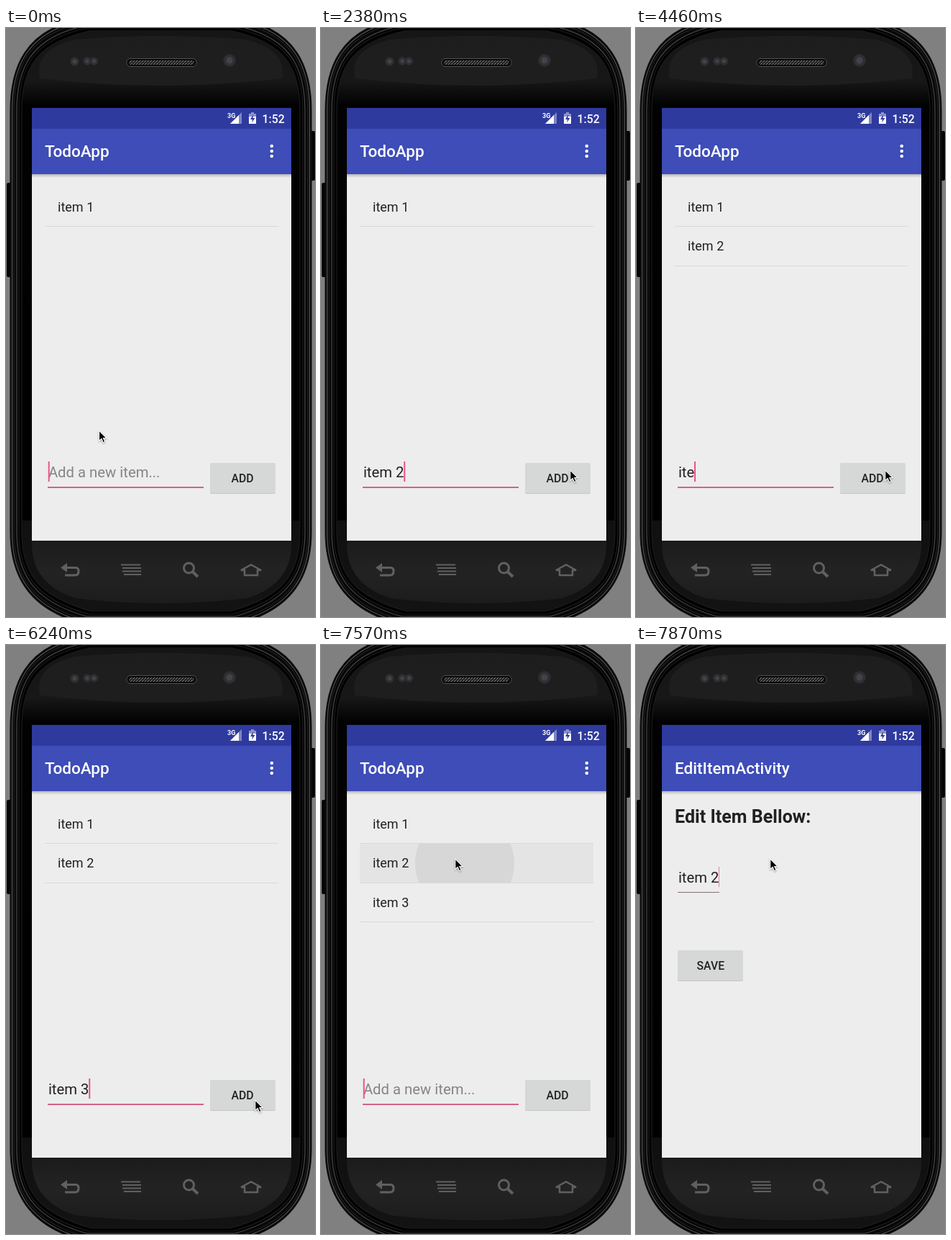
An HTML page that plays this animation: 430 by 818 pixels, repeating every 8000 ms.

```html
<!DOCTYPE html>
<html lang="en">
<head>
<meta charset="utf-8">
<title>TodoApp</title>
<style>
  html, body { margin: 0; width: 100%; height: 100%; overflow: hidden; background: #808080; }
  svg { display: block; width: 430px; height: 818px; }
  text { font-family: Roboto, sans-serif; fill: #212121; white-space: pre; }
  .title { font-size: 22.56px; font-weight: 500; fill: #fff; }
  .row { font-size: 18.05px; }
  .field { font-size: 20.3px; }
  .label { font-size: 15.8px; font-weight: 500; text-anchor: middle; }
  .clock { font-size: 15.8px; font-weight: 500; fill: #fff; }
  .keys { fill: none; stroke: #606060; stroke-width: 3; }
  #mouse { filter: drop-shadow(0 1px 1px rgba(0, 0, 0, .35)); }
</style>
</head>
<body>
<svg viewBox="0 0 430 818">
  <defs>
    <clipPath id="screen"><rect x="36" y="111" width="361" height="601"/></clipPath>
    <clipPath id="addClip"><rect x="284" y="604" width="91" height="42" rx="2"/></clipPath>
    <clipPath id="rowClip"><rect x="54" y="275.5" width="325" height="54.5"/></clipPath>
    <linearGradient id="face" gradientUnits="userSpaceOnUse" x1="0" y1="0" x2="0" y2="818">
      <stop stop-color="#151515"/><stop offset=".09" stop-color="#171717"/><stop offset=".13" stop-color="#020202"/>
      <stop offset=".836" stop-color="#000"/><stop offset=".836" stop-color="#101010"/><stop offset="1" stop-color="#131313"/>
    </linearGradient>
    <linearGradient id="chin" x2="0" y2="1">
      <stop stop-color="#1b1b1b"/><stop offset=".5" stop-color="#232323"/><stop offset="1" stop-color="#1c1c1c"/>
    </linearGradient>
    <linearGradient id="shade" x2="0" y2="1">
      <stop stop-opacity=".22"/><stop offset="1" stop-opacity="0"/>
    </linearGradient>
    <pattern id="mesh" width="4" height="4" patternUnits="userSpaceOnUse">
      <rect width="4" height="4" fill="#111"/><path d="M0 4L4 0" stroke="#6a6a6a" stroke-width="1.3"/>
    </pattern>
    <g id="bar">
      <rect x="36" y="140" width="361" height="63" fill="#3e4db7"/>
      <rect x="36" y="203" width="361" height="5" fill="url(#shade)"/>
    </g>
    <g id="button">
      <rect y="1" width="91" height="42" rx="2" fill="#c6c6c6"/>
      <rect width="91" height="42" rx="2" fill="#d6d7d7"/>
    </g>
  </defs>

  <!-- phone body -->
  <rect x="1" y="215" width="8" height="131" rx="2" fill="#050505"/>
  <rect x="422" y="143" width="8" height="69" rx="2" fill="#050505"/>
  <g id="rims"></g>
  <path d="M96 16Q215 6 334 16Q392 30 384 70Q215 90 47 70Q38 30 96 16Z" fill="#222" opacity=".7"/>
  <path d="M36 712H397Q400 771 336 792Q216 806 97 792Q34 772 36 712Z" fill="url(#chin)"/>
  <rect x="168" y="42.5" width="97" height="11" rx="5" fill="#080808" stroke="#505050"/>
  <rect x="171" y="45" width="91" height="6" rx="3" fill="url(#mesh)"/>
  <g fill="#303033" stroke="#292929">
    <circle cx="95.5" cy="46.5" r="6"/><circle cx="113" cy="46" r="5.5"/><circle cx="122.5" cy="46" r="5.5"/>
    <circle cx="311" cy="45" r="8.5"/>
  </g>
  <g fill="#41434b">
    <circle cx="95.5" cy="46.5" r="3"/><circle cx="113" cy="46" r="2.5"/><circle cx="122.5" cy="46" r="2.5"/>
    <circle cx="311" cy="45" r="4.5"/>
  </g>
  <g class="keys">
    <path d="M83 749.5H97Q101 749.5 101 754.5Q101 760 96 760H82"/>
    <path d="M76 749.5L85 743V756Z" fill="#606060" stroke="none"/>
    <path d="M160 745.5H187M162 750H188M162 754.5H188M164 759H188" stroke-width="2"/>
    <circle cx="254.5" cy="750" r="7"/><path d="M259.5 755L267 762" stroke-width="4"/>
    <path d="M327 753L341 745.5L355 753H350V760H332V753Z" stroke-width="2.5"/>
  </g>

  <g clip-path="url(#screen)">
    <rect x="36" y="111" width="361" height="601" fill="#ededed"/>
    <g id="list">
      <use href="#bar"/>
      <text class="title" x="54" y="179.3">TodoApp</text>
      <g fill="#fff"><circle cx="369.8" cy="164" r="2.3"/><circle cx="369.8" cy="171" r="2.3"/><circle cx="369.8" cy="178" r="2.3"/></g>
      <g id="rowPress" clip-path="url(#rowClip)">
        <rect x="54" y="275" width="325" height="56" fill="#e4e4e4"/>
        <circle id="rowRipple" cy="303" fill="#d7d7d7"/>
      </g>
      <g id="rows"></g>
      <text id="hint" class="field" x="58.9" y="624" style="fill:#858585">Add a new item...</text>
      <text id="typed" class="field" x="58.9" y="624"></text>
      <rect x="58" y="637" width="217" height="2" fill="#d4608b"/>
      <rect id="caret" y="602" width="2" height="28" fill="#f0508a"/>
      <use href="#button" x="284" y="604"/>
      <g id="addPress" clip-path="url(#addClip)">
        <rect x="284" y="604" width="91" height="42" fill="#c9caca"/>
        <circle id="addRipple" cx="338" cy="625" r="34" fill="#bcbdbd"/>
      </g>
      <text class="label" x="329" y="631">ADD</text>
    </g>
    <g id="edit">
      <rect x="36" y="140" width="361" height="590" fill="#ededed"/>
      <use href="#bar"/>
      <text class="title" x="54" y="179.3">EditItemActivity</text>
      <text x="54" y="247" font-size="25.1" font-weight="700">Edit Item Bellow:</text>
      <text class="field" x="58.9" y="330">item 2</text>
      <rect x="58" y="343" width="58" height="1" fill="#83706f"/>
      <rect x="115" y="308" width="1" height="28" fill="#de86a5"/>
      <use href="#button" x="58" y="424"/>
      <text class="label" x="103.8" y="451">SAVE</text>
    </g>
    <rect x="36" y="111" width="361" height="29" fill="#2f3a9e"/>
    <text x="308" y="125" font-size="9" font-weight="700" style="fill:#fff">3G</text>
    <path d="M328 117V133H312Z" fill="#7f86c4"/>
    <path d="M324 121V133H312Z" fill="#fff"/>
    <path d="M338 119H341V117H345V119H348V133H338Z" fill="#8d93cb"/>
    <path d="M338 123H348V133H338Z" fill="#fff"/>
    <path d="M344 120L340 127H343L342 131.5L346.5 125H343.5Z" fill="#2f3a9e"/>
    <text class="clock" x="356.5" y="131.5">1:52</text>
  </g>
  <path id="mouse" d="M0 0V14.5L3.4 11.5L5.7 16.8L8.3 15.7L6 10.5H10.5Z"
        fill="#000" stroke="#fff" stroke-width="1.1"/>
</svg>
<script>
const LOOP = 8000, TICK = 148.5;
const $ = id => document.getElementById(id);
const show = (id, on) => $(id).style.display = on ? '' : 'none';
const mix = (a, b, p) => a + (b - a) * p;
const ease = p => p * p * (3 - 2 * p);

// Outline of the casing, inset by d
function casing(d) {
  const l = 6 + d, r = 425 - d, top = d - 12, base = 826 - d;
  return `M${l} 115C${l} 55 ${l + 20} ${top + 16} ${l + 95} ${top}H${r - 95}
    C${r - 20} ${top + 16} ${r} 55 ${r} 115V700C${r} 760 ${r - 25} ${base - 20} ${r - 97} ${base}
    H${l + 97}C${l + 25} ${base - 20} ${l} 760 ${l} 700Z`;
}
$('rims').innerHTML = [[0, '#060606', '#111'], [2.5, '#060606', '#555'], [5, '#080808', '#222'],
  [9, '#030303', '#484848'], [12, '#000', '#1b1b1b'], [16, 'url(#face)', '#1b1b1b']].map(([d, fill, line]) =>
  `<path d="${casing(d)}" fill="${fill}" stroke="${line}" stroke-width="1.2"/>`).join('');

$('rows').innerHTML = [1, 2, 3].map(i => {
  const y = 275.4 + (i - 1) * 54.7;
  return `<g id="row${i}"><text class="row" x="72" y="${y - 20.7}">item ${i}</text>
    <rect x="54" y="${Math.floor(y)}" width="325" height="1" fill="#d9d9d9"/></g>`;
}).join('');

// Tick at which the field takes each value
const typing = [[0, ''], [2, 'i'], [3, 'ite'], [4, 'item'], [6, 'item '], [9, 'item 2'], [19, ''],
  [26, 'i'], [28, 'it'], [30, 'ite'], [31, 'item'], [32, 'item '], [36, 'item 3'], [44, '']];
const caretOff = [[12, 16], [22, 25], [39, 42], [47, 50]];
// Mouse stops: tick, x, y
const stops = [[0, 129.5, 559], [12, 129.5, 559], [16, 346.8, 614], [39, 346.8, 614],
  [40, 346.8, 632], [44, 346.8, 632], [48, 186.8, 297], [54, 186.8, 297]];

function mouseAt(n) {
  const i = stops.findIndex(s => s[0] > n);
  const a = stops[i - 1], b = stops[i], p = ease((n - a[0]) / (b[0] - a[0]));
  return [mix(a[1], b[1], p), mix(a[2], b[2], p)];
}

function draw(t) {
  const n = Math.floor((t + 6) / TICK);
  const value = typing.filter(s => s[0] <= n).pop()[1];
  $('typed').textContent = value;
  show('hint', !value);
  const width = value ? $('typed').getComputedTextLength() : 0;
  $('caret').setAttribute('x', 58.7 + width);
  show('caret', !caretOff.some(([a, b]) => n >= a && n < b));

  show('row2', n >= 19);
  show('row3', n >= 44);
  show('addPress', n === 18 || n === 43);
  show('rowPress', n >= 49);
  const grow = Math.max(0, n - 49) / 2;
  $('rowRipple').setAttribute('cx', mix(187, 200, grow));
  $('rowRipple').setAttribute('r', mix(10, 69, grow));

  show('edit', n >= 52);
  $('edit').setAttribute('opacity', n === 52 ? .6 : 1);
  $('edit').setAttribute('transform', `translate(0 ${n === 52 ? 10 : 0})`);
  $('mouse').setAttribute('transform', `translate(${mouseAt(n)})`);
}

function frame() {
  draw(performance.now() % LOOP);
  requestAnimationFrame(frame);
}
frame();
</script>
</body>
</html>
```
